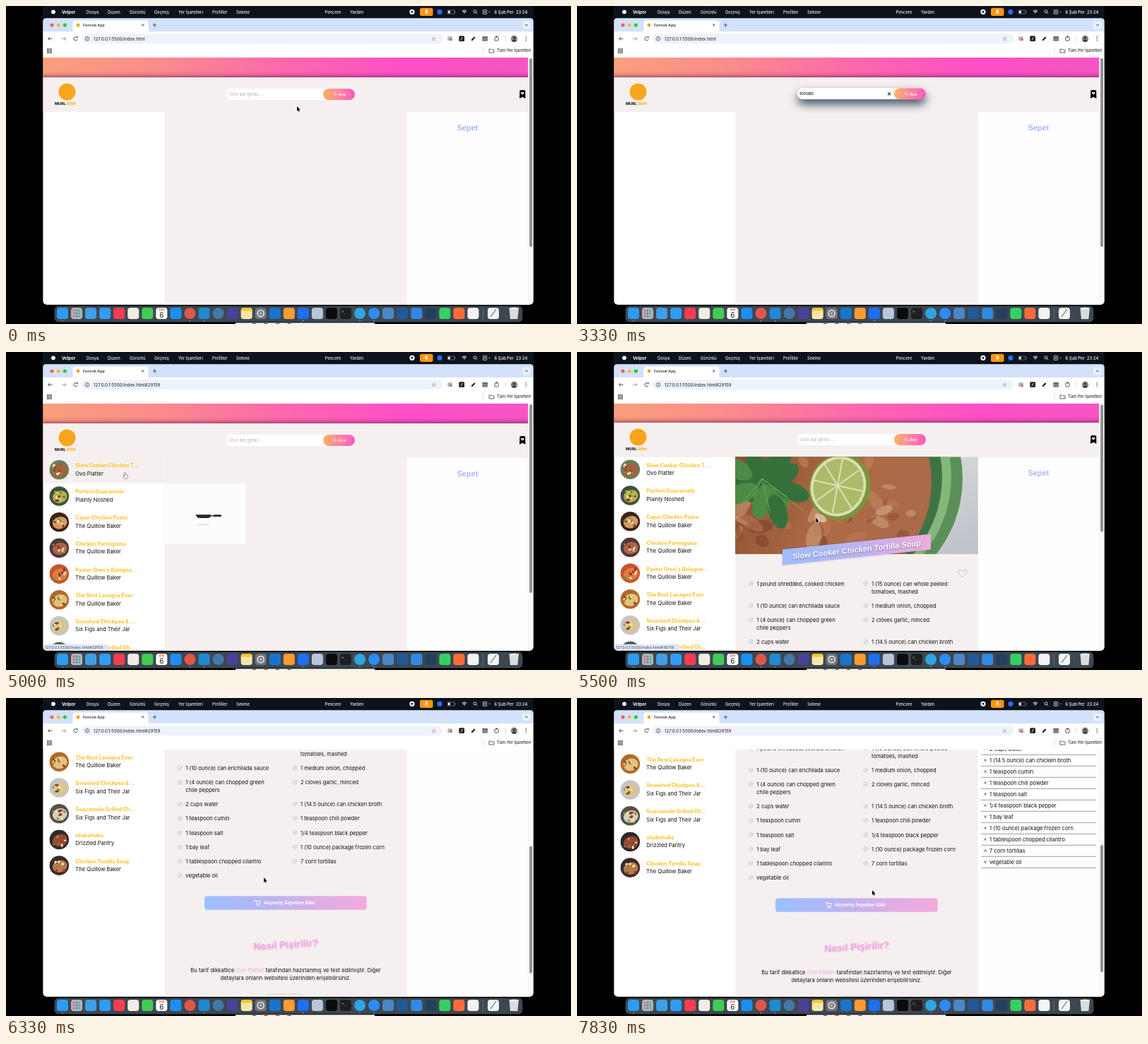
An HTML page with a canvas that plays this animation: 800 by 450 pixels, repeating every 8 s.

```html
<!DOCTYPE html>
<html lang="tr">
<head>
<meta charset="utf-8">
<title>Fennok App</title>
<style>
html, body { margin: 0; width: 100%; height: 100%; overflow: hidden; background: #000; }
canvas { display: block; width: 800px; height: 450px; }
</style>
</head>
<body>
<canvas id="stage"></canvas>
<script>
const cv = document.getElementById('stage');
const dpr = window.devicePixelRatio || 1;
cv.width = 800 * dpr;
cv.height = 450 * dpr;
const c = cv.getContext('2d');

const LOOP = 8000, STEP = 1000 / 6;
const UI = 'Inter, "Open Sans", sans-serif';
const ARIAL = '"Liberation Sans", Arial, sans-serif';

// ---------- helpers ----------
function rect(x, y, w, h, fill, r = 0) {
  c.fillStyle = fill;
  c.beginPath();
  c.roundRect(x, y, w, h, r);
  c.fill();
}
function disc(x, y, r, fill) {
  c.fillStyle = fill;
  c.beginPath();
  c.arc(x, y, r, 0, 7);
  c.fill();
}
function oval(x, y, rx, ry, rot, fill) {
  c.fillStyle = fill;
  c.beginPath();
  c.ellipse(x, y, rx, ry, rot, 0, 7);
  c.fill();
}
function ring(x, y, r, color, w = 1, from = 0, to = 7) {
  c.strokeStyle = color;
  c.lineWidth = w;
  c.beginPath();
  c.arc(x, y, r, from, to);
  c.stroke();
}
function line(color, w, ...p) {
  c.strokeStyle = color;
  c.lineWidth = w;
  c.beginPath();
  for (let i = 0; i < p.length; i += 2) c.lineTo(p[i], p[i + 1]);
  c.stroke();
}
function text(s, x, y, size, color, weight = 400, family = UI, align = 'left') {
  c.font = `${weight} ${size}px ${family}`;
  c.fillStyle = color;
  c.textAlign = align;
  c.fillText(s, x, y);
  return c.measureText(s).width;
}
function grad(x0, y0, x1, y1, ...colors) {
  const g = c.createLinearGradient(x0, y0, x1, y1);
  colors.forEach((k, i) => g.addColorStop(i / (colors.length - 1), k));
  return g;
}
function saved(draw) { c.save(); draw(); c.restore(); }
const clamp = v => Math.max(0, Math.min(1, v));
const ease = v => { v = clamp(v); return v * v * (3 - 2 * v); };
const ramp = (t, a, b) => ease((t - a) / (b - a));
function rng(seed) {
  return () => (seed = (seed * 16807) % 2147483647) / 2147483647;
}

// ---------- content ----------
const BAKER = 'The Quillow Baker', FIGS = 'Six Figs and Their Jar';
const recipes = [
  ['Slow Cooker Chicken T...', 'Ovo Platter', '#6b7a58', '#a8603c'],
  ['Perfect Guacamole', 'Plainly Noshed', '#3c5238', '#b3b54c'],
  ['Cajun Chicken Pasta', BAKER, '#3a2418', '#d69a62'],
  ['Chicken Parmigiana', BAKER, '#4a3a3c', '#b5604a'],
  ["Pastor Oren's Bologne...", BAKER, '#c8542c', '#e27a44'],
  ['The Best Lasagna Ever', BAKER, '#b06a2c', '#e8c078'],
  ['Smashed Chickpea & ...', FIGS, '#c3c6c4', '#dcc48e'],
  ['Guacamole Grilled Ch...', FIGS, '#54524a', '#d6d0b8'],
  ['shakshuka', 'Drizzled Pantry', '#2c2a2c', '#9a4a30'],
  ['Chicken Tortilla Soup', BAKER, '#3a2a26', '#bc7a4c']
];
const ingredients = [
  '1 pound shredded, cooked chicken', '1 (15 ounce) can whole peeled|tomatoes, mashed',
  '1 (10 ounce) can enchilada sauce', '1 medium onion, chopped',
  '1 (4 ounce) can chopped green|chile peppers', '2 cloves garlic, minced',
  '2 cups water', '1 (14.5 ounce) can chicken broth',
  '1 teaspoon cumin', '1 teaspoon chili powder',
  '1 teaspoon salt', '1/4 teaspoon black pepper',
  '1 bay leaf', '1 (10 ounce) package frozen corn',
  '1 tablespoon chopped cilantro', '7 corn tortillas', 'vegetable oil'
];
const keyTimes = [1833, 2000, 2167, 2333, 2667, 2833];

// time, x, y of the pointer
const path = [
  [0, 412, 142], [500, 400, 136], [1000, 372, 124], [3333, 385, 125],
  [3667, 466, 126], [3950, 470, 126], [4667, 172, 168], [5000, 168, 171],
  [5167, 190, 184], [5500, 338, 234.5], [6333, 365, 254], [6667, 402, 288],
  [7167, 408, 289], [7833, 418, 272]
];
function pointer(t) {
  let i = 0;
  while (i < path.length - 2 && t >= path[i + 1][0]) i++;
  const [a, b] = [path[i], path[i + 1]];
  const k = ramp(t, a[0], b[0]);
  return [a[1] + (b[1] - a[1]) * k, a[2] + (b[2] - a[2]) * k];
}
function scrollAt(t) {
  return ramp(t, 5445, 5500) + 259.5 * ramp(t, 5500, 6250) - 3 * ramp(t, 7000, 7700);
}

// ---------- window ----------
function menuBar() {
  rect(52, 0, 694.5, 18, '#0d131c');
  disc(67, 8.3, 2.9, '#fff');
  text('Velpor', 79, 10.5, 6, '#fff', 700);
  [['Dosya', 114], ['Düzen', 144], ['Görüntü', 175], ['Geçmiş', 210], ['Yer İşaretleri', 244],
   ['Profiller', 292], ['Sekme', 326], ['Pencere', 451.5], ['Yardım', 487]]
    .forEach(([s, x]) => text(s, x, 10.5, 5.8, '#eef0f3', 500));
  disc(575, 8.3, 3.6, '#fff');
  rect(573.7, 7, 2.6, 2.6, '#0d131c', .5);
  rect(586, 2.7, 18.5, 11.2, '#ff9410', 2.5);
  rect(594, 4.8, 2.6, 4.6, '#fff', 1.3);
  ring(595.3, 7.9, 2.4, '#fff', .7, 0, Math.PI);
  line('#fff', .7, 595.3, 10.3, 595.3, 12);
  disc(614, 8.3, 3.6, '#2d6cf0');
  c.strokeStyle = '#8e949c';
  c.lineWidth = .6;
  c.strokeRect(625.5, 6, 9.5, 5);
  rect(626.2, 6.7, 2.6, 3.6, '#fff');
  rect(635.6, 7.6, .9, 1.8, '#8e949c');
  for (const r of [1.5, 3.2, 4.9]) ring(649, 11, r, '#fff', .9, -2.3, -.85);
  ring(664, 7.8, 2, '#fff', .8);
  line('#fff', .8, 665.5, 9.3, 667.3, 11);
  c.strokeStyle = '#fff';
  c.lineWidth = .7;
  c.beginPath();
  c.roundRect(675, 5.4, 6, 2.4, 1.2);
  c.roundRect(675, 9, 6, 2.4, 1.2);
  c.stroke();
  disc(684.5, 8.3, .9, '#ff9410');
  text('6 Şub Per  23:24', 691.5, 10.5, 5.9, '#fff', 500);
}

function browser(t) {
  rect(52.5, 17.5, 694, 405, '#fff', [4, 4, 5, 5]);
  rect(52.5, 17.5, 694, 20, '#d3e2fa', [4, 4, 0, 0]);
  ['#fe5f57', '#febc2e', '#28c840'].forEach((k, i) => disc(65 + i * 9.2, 27, 2.6, k));
  rect(94.5, 20.5, 107, 18, '#fff', [4, 4, 0, 0]);
  disc(102, 27, 2.4, '#f5a01c');
  text('Fennok App', 109, 29, 5.4, '#202124', 500);
  line('#333', .8, 192, 25.2, 195.4, 28.6);
  line('#333', .8, 195.4, 25.2, 192, 28.6);
  line('#333', .8, 207.8, 27, 213, 27);
  line('#333', .8, 210.4, 24.4, 210.4, 29.6);
  rect(731, 21.5, 12, 11, '#e9f0fd', 3);
  line('#333', .9, 735, 26, 737, 28, 739, 26);

  rect(52.5, 36, 694, 37, '#fff');
  rect(107, 39.5, 511, 13.5, '#edf2fb', 6.7);
  line('#3c4043', .9, 65.5, 46.3, 59.8, 46.3);
  line('#3c4043', .9, 62.2, 43.8, 59.7, 46.3, 62.2, 48.8);
  line('#8e9296', .9, 79, 46.3, 84.8, 46.3);
  line('#8e9296', .9, 82.4, 43.8, 84.9, 46.3, 82.4, 48.8);
  ring(98.5, 46.3, 2.6, '#3c4043', .9, .3, 5.5);
  rect(100, 43.3, 1.6, 1.9, '#3c4043');
  ring(115, 46.3, 2.8, '#3c4043', .7);
  line('#3c4043', .8, 115, 45.8, 115, 48);
  disc(115, 44.7, .5, '#3c4043');
  const hash = t >= 4833 ? '#29159' : '';
  text('127.0.0.1:5500/index.html' + hash, 124, 48.5, 6.2, '#1f2023');
  text('☆', 605.7, 49, 8, '#333', 400, '"DejaVu Sans", sans-serif', 'center');
  rect(625.3, 43.3, 6.6, 5.6, '#aeb4bb', 1);
  disc(630, 47.6, 1.6, '#dd5b55');
  rect(641.3, 42.2, 7.8, 7.8, '#222', 1.6);
  line('#fff', .8, 644, 48.5, 646.4, 43.9);
  line('#222', 2.2, 659.3, 48.7, 663.8, 44);
  rect(674.3, 42.8, 7.8, 3.5, '#6b747c');
  rect(674.3, 46.3, 7.8, 3.2, '#c14e88');
  rect(676, 47, 4, 2.5, '#4aa06a');
  c.strokeStyle = '#3c4043';
  c.lineWidth = .9;
  c.beginPath();
  c.roundRect(692, 43.8, 5.2, 5.2, .8);
  c.stroke();
  disc(694.6, 43.3, 1.1, '#3c4043');
  line('#c6d4ec', .8, 707, 42, 707, 50);
  saved(() => {
    c.beginPath();
    c.arc(719.5, 46.3, 4.7, 0, 7);
    c.clip();
    rect(714, 41, 11, 11, '#8d8a80');
    disc(719.5, 45, 2, '#4a4038');
    oval(719.5, 51, 4, 3.4, 0, '#3a4540');
  });
  for (const y of [43.7, 46.3, 48.9]) disc(736.3, y, .7, '#333');

  for (const x of [58.5, 62.2]) for (const y of [60.6, 64.2]) {
    c.strokeStyle = '#3c4043';
    c.lineWidth = .8;
    c.strokeRect(x, y, 2.3, 2.3);
  }
  line('#c6d4ec', .8, 676, 59, 676, 67);
  line('#3c4043', .8, 684, 66, 684, 61, 686.5, 61, 687.4, 62, 691, 62, 691, 66, 684, 66);
  text('Tüm Yer İşaretleri', 695, 65.3, 5.8, '#333', 500);
}

// ---------- page ----------
function pageHeader(t) {
  rect(52.5, 73, 687, 28, grad(52, 66, 739, 110, '#f9a07c', '#fb8a8c', '#fc68ac', '#ff4fc8', '#f556c4'));
  rect(52.5, 92, 687, 9, grad(0, 92, 0, 101, 'rgba(110,20,80,0)', 'rgba(110,20,80,.12)', 'rgba(110,20,80,.5)'));
  rect(52.5, 101, 687, 49, '#f5f0ef');
  disc(86.5, 121.5, 12, '#f9a61c');
  const w = text('MURL ', 69, 140.2, 5.4, '#222', 800);
  text('DISH', 69 + w, 140.2, 5.4, '#f9b21c', 800);

  const hover = ramp(t, 500, 900) * (1 - ramp(t, 4050, 4400));
  saved(() => {
    c.shadowColor = `rgba(62,78,100,${hover})`;
    c.shadowBlur = 13 * dpr;
    c.shadowOffsetY = 7 * dpr;
    rect(312, 117 - hover, 182, 16, '#fff', 8);
  });
  const y = 125 - hover * .7;
  rect(449, y - 8, 45, 16, grad(449, y, 494, y + 6, '#fbb162', '#fd86a0', '#f958c2'), 8);
  ring(465.8, y - .6, 1.7, '#ffe9f0', .7);
  line('#ffe9f0', .8, 467, y + .7, 468.6, y + 2.2);
  text('Ara', 470.5, y + 2.2, 6.2, '#fff', 700, ARIAL);

  const typed = t < 4167 ? 'tomato'.slice(0, keyTimes.filter(k => t + 1 >= k).length) : '';
  if (typed) {
    const tw = text(typed, 315.3, y + 2, 6.5, '#111', 400, ARIAL);
    if (t < 3333) line('#111', .6, 315.8 + tw, y - 3, 315.8 + tw, y + 3);
    line('#344', 1.1, 440.2, y - 1.8, 444, y + 2);
    line('#344', 1.1, 444, y - 1.8, 440.2, y + 2);
  } else {
    text('Ürün adı giriniz ...', 315.3, y + 2, 6.3, '#b5b3b3', 400, ARIAL);
    if (t >= 1000 && t < 1333) line('#111', .6, 315.5, y - 3, 315.5, y + 3);
  }

  rect(727.3, 119, 8, 10, '#000', [1.5, 1.5, 0, 0]);
  c.beginPath();
  c.moveTo(727.3, 127);
  c.lineTo(727.3, 131);
  c.lineTo(731.3, 128.6);
  c.lineTo(735.3, 131);
  c.lineTo(735.3, 127);
  c.fill();
  heart(731.3, 123.6, 1.9);
  c.fillStyle = '#fff';
  c.fill();
}

function heart(x, y, s) {
  c.beginPath();
  c.moveTo(x, y + s);
  c.bezierCurveTo(x - s * 2.2, y - s * .5, x - s * .8, y - s * 1.6, x, y - s * .45);
  c.bezierCurveTo(x + s * .8, y - s * 1.6, x + s * 2.2, y - s * .5, x, y + s);
  c.closePath();
}

function loader(x, t) {
  rect(x, 186, 115, 86, '#fcfcfc');
  rect(x + 46.5, 243.4, 17, 1.9, '#dedede', 1);
  saved(() => {
    c.translate(x + 64, 232);
    c.rotate(.25 * Math.sin((t - 5000) / 110));
    c.fillStyle = '#20262a';
    c.beginPath();
    c.moveTo(-20, -2);
    c.lineTo(2, -2);
    c.lineTo(0, 2.4);
    c.quadraticCurveTo(-9, 3.6, -17.5, 2.4);
    c.fill();
    rect(-20, -1.6, 22, .9, '#47604a');
    line('#20262a', 1.4, 0, .4, 6, -.4);
    rect(5, -1.7, 11.5, 2.8, '#20262a', 1.4);
  });
}

function thumb(x, y, base, food, seed) {
  saved(() => {
    c.beginPath();
    c.arc(x, y, 13.8, 0, 7);
    c.clip();
    rect(x - 14, y - 14, 28, 28, base);
    oval(x + 1, y + 1, 10.5, 8.5, -.3, food);
    const rnd = rng(seed * 97 + 31);
    const tones = ['#7c8c44', '#f0dcb0', '#8c3c24', food];
    for (let i = 0; i < 11; i++)
      oval(x - 8 + rnd() * 17, y - 6 + rnd() * 14, 1 + rnd() * 2, 1 + rnd(), rnd() * 3, tones[i % 4]);
  });
}

function recipeList(t) {
  recipes.forEach(([title, by, base, food], i) => {
    const hot = i === 0 && t >= 4583 && t < 5250;
    const y = 167.3 + i * 36.7 - (hot ? .5 : 0);
    if (hot) rect(52.5, 149.5, 171.5, 36, '#f5f0ef');
    thumb(75.3, y, base, food, i + 1);
    text(title, 98.3, y - 3.6, 7.25, '#fbc83c', 800);
    text(by, 98.3, y + 7.8, 7.55, '#111');
  });
}

function soupPhoto() {
  saved(() => {
    c.beginPath();
    c.rect(224.3, 149.5, 343.5, 137.5);
    c.clip();
    rect(224, 149, 344, 138, grad(500, 149, 568, 287, '#d4dad8', '#bfc0cb'));
    oval(365, 180, 181, 176, 0, '#5a9057');
    oval(356, 178, 174, 172, 0, '#84b878');
    oval(346, 178, 171, 168, 0, '#3f7345');
    oval(330, 185, 172, 164, 0, grad(224, 150, 500, 287, '#8c4f30', '#ad6a45', '#a96a4c'));
    const rnd = rng(77);
    const tones = ['#c48a62', '#8f4c31', '#bd7a54', '#d3a380', '#74402c'];
    for (let i = 0; i < 38; i++)
      oval(224 + rnd() * 260, 152 + rnd() * 132, 4 + rnd() * 17, 3 + rnd() * 8, rnd() * 3, tones[i % 5] + '88');
    // lime slice
    oval(372, 192, 43, 47, .35, '#77963f');
    oval(370, 191, 39, 43, .35, '#dbe0ae');
    oval(370, 191, 35, 39, .35, '#adba6b');
    for (let i = 0; i < 8; i++) {
      const a = i * Math.PI / 4 + .2;
      line('#dde2b4', 2, 369, 190, 369 + 36 * Math.cos(a), 190 + 39 * Math.sin(a));
    }
    // herb leaves
    for (let i = 0; i < 13; i++) {
      const a = i * 2.4, r = 8 + i * 3.4;
      oval(270 + r * 1.05 * Math.cos(a), 188 + r * .9 * Math.sin(a), 25, 13, a, i % 3 ? '#35703a' : '#4d8a45');
    }
    for (let i = 0; i < 5; i++) line('#79a763', 1, 262, 180, 225 + i * 24, 226 - i % 2 * 20);
    oval(345, 236, 9, 5, .5, '#dfb294');
    oval(435, 225, 13, 6, -.4, '#c98f6e');
  });
}

function banner() {
  saved(() => {
    c.transform(1, -.105, 0, 1, 396, 280.5);
    c.shadowColor = 'rgba(70,50,90,.3)';
    c.shadowBlur = 3 * dpr;
    rect(-105, -11, 210, 22, grad(-105, 0, 105, 0, '#9abfff', '#bcb3f0', '#f0abdc'));
    c.shadowColor = 'rgba(40,40,80,.5)';
    c.shadowOffsetY = dpr;
    text('Slow Cooker Chicken Tortilla Soup', 0, 4, 11, '#fff', 700, ARIAL, 'center');
  });
}

function recipe(t) {
  soupPhoto();
  banner();
  heart(545.7, 314, 5.3);
  c.strokeStyle = '#b9b6b8';
  c.lineWidth = .8;
  c.stroke();

  const rows = [329, 360, 380, 411];
  ingredients.forEach((s, i) => {
    const r = i >> 1, x = i % 2 ? 417 : 254.3;
    const y = r < 4 ? rows[r] : 411 + (r - 3) * 20.2;
    ring(x - 8.2, y - .3, 3, '#a9c8ea', .7);
    line('#8fb4de', .8, x - 9.8, y - .5, x - 8.5, y + .8, x - 5.8, y - 2.2);
    s.split('|').forEach((part, k) => text(part, x, y + 2.6 + k * 11, 7.55, '#111'));
  });

  rect(281, 540.7, 229.7, 19.5, grad(281, 0, 511, 0, '#9bc0ff', '#b4b5f4', '#d9aee6', '#f3abdb'), 4);
  line('#fff', .9, 351.5, 546.8, 353.3, 546.8, 355, 552, 359, 552, 360.2, 548, 354, 548);
  disc(355.4, 554, .9, '#fff');
  disc(358.8, 554, .9, '#fff');
  text('Alışveriş Sepetine Ekle', 365, 552.7, 6.6, '#fff', 700, ARIAL);

  saved(() => {
    c.transform(1, -.06, 0, 1, 396, 609);
    c.shadowColor = 'rgba(190,120,190,.45)';
    c.shadowBlur = 2 * dpr;
    c.shadowOffsetX = c.shadowOffsetY = dpr;
    text('Nasıl Pişirilir?', 0, 5, 13.8, '#f5a9e4', 700, ARIAL, 'center');
  });

  const parts = [['Bu tarif dikkatlice ', '#111'], ['Ovo Platter', '#f0a8e0'],
    [' tarafından hazırlanmış ve test edilmiştir. Diğer', '#111']];
  c.font = `400 7.6px ${UI}`;
  let x = 396 - c.measureText(parts.map(p => p[0]).join('')).width / 2;
  for (const [s, k] of parts) x += text(s, x, 648, 7.6, k);
  text('detaylara onların websitesi üzerinden erişebilirsiniz.', 396, 659, 7.6, '#111', 400, UI, 'center');
  c.strokeStyle = '#c9c5c8';
  c.lineWidth = .8;
  c.beginPath();
  c.roundRect(370, 679.5, 50, 18, 4);
  c.stroke();
}

function basket() {
  let y = 211.5;
  for (const s of ingredients) {
    const lines = s.split('|');
    const h = 16 + (lines.length - 1) * 11;
    const mid = y + (lines.length - 1) * 5.5;
    line('#333', .7, 576.4, mid - 1.7, 579.8, mid + 1.7);
    line('#333', .7, 579.8, mid - 1.7, 576.4, mid + 1.7);
    lines.forEach((p, k) => text(p, 584, y + 2.6 + k * 11, 7.55, '#111'));
    line('#858585', .8, 572, y + h - 7.7, 735, y + h - 7.7);
    y += h;
  }
}

function page(t) {
  const s = scrollAt(t), open = t >= 5330;
  saved(() => {
    c.beginPath();
    c.roundRect(52.5, 73, 694, 349.5, [0, 0, 5, 5]);
    c.clip();
    c.translate(0, -s);
    rect(52.5, 100, 694, 700, '#fff');
    rect(224.3, 149.5, 343.5, 650, '#f5f0ef');
    rect(567.8, 149.5, 171.7, 650, '#fefefe');
    pageHeader(t);
    text('Sepet', 653.5, 175.5, 10.9, '#a3b8fa', 700, ARIAL, 'center');
    if (t >= 3830 && t < 4165) loader(52.5, t);
    if (t >= 4165) recipeList(t);
    if (t >= 4830 && !open) loader(224.5, t);
    if (open) recipe(t);
    if (t >= 6830) basket();
    c.translate(0, s);

    rect(739.5, 73, 7.5, 350, '#fafafa');
    line('#e6e6e6', .5, 739.7, 73, 739.7, 423);
    rect(741.2, 74 + s * .52, 3.9, open ? 180 : 267, '#8e8e8e', 2);

    if (t >= 4580 && t < 5800) {
      rect(52.5, 413.6, 93, 9, '#dde6f6', [0, 3, 0, 0]);
      text('127.0.0.1:5500/index.html#' + (t < 5330 ? '29159' : '36718'), 55, 420.2, 5.4, '#4a4f57');
    }
  });
}

// ---------- dock ----------
const dock = ('#2b9cf2 #b4b7c0 #3f9fe8 #2f9df6 #fa3c52 #f1ece4 #3fce52 #ffffff #1c8ff4 #e2564a ' +
  '#2089d0 #4478a8 #4a4298 #f8eaa8 #70747a #1b74cc #ff9b30 #1f6ff0 #b9c6da #0b0b0b ' +
  '#1e1e20 #2ea5e0 #2d8cff #4b87c4 #215a98 #2e8ae4 #24405e #36d062 #ff6c38 #f3f3f3').split(' ');
const round = [9, 11, 21, 22];

function dockBar() {
  rect(68.5, 424.5, 663, 22.7, '#3d4751', 6);
  dock.forEach((k, i) => {
    const x = 80 + i * 20.05;
    if (round.includes(i)) disc(x, 435, 8, k);
    else rect(x - 8, 427, 16, 16, k, 3.8);
  });
  for (let i = 0; i < 9; i++)
    rect(94.6 + i % 3 * 4, 429.6 + (i / 3 | 0) * 4, 2.8, 2.8, ['#f06a5a', '#58b86a', '#4a8ae8'][i * 2 % 3], .8);
  text('ŞUB', 220.3, 431.2, 3.6, '#f0433c', 700, UI, 'center');
  text('6', 220.3, 441, 10, '#222', 400, UI, 'center');
  rect(332.7, 427, 16, 4.5, '#f8c62f', [3.8, 3.8, 0, 0]);
  line('#d6cfa8', .6, 335, 435, 346, 435);
  line('#d6cfa8', .6, 335, 438.5, 346, 438.5);
  ring(360.7, 435, 4.5, '#d4d6d9', 2);
  disc(360.7, 435, 1.5, '#d4d6d9');
  text('>_', 475.3, 433.8, 5, '#eee', 400, '"DejaVu Sans Mono", monospace');
  line('#77818b', .6, 675.5, 428, 675.5, 444);
  rect(682, 427, 16, 16, '#f3f4f2', 3.8);
  line('#66727a', 1.2, 686, 440, 694, 429);
  c.fillStyle = '#d9dde0';
  c.beginPath();
  c.moveTo(712.5, 427.5);
  c.lineTo(726, 427.5);
  c.lineTo(724.4, 443);
  c.lineTo(714, 443);
  c.fill();
  oval(719.2, 427.8, 6.8, 1.3, 0, '#f5f6f7');
  for (const i of [0, 9, 10, 17, 21, 22]) disc(80 + i * 20.05, 445.6, .7, '#d5d8db');
  rect(325, 448.2, 197, 2, '#eef0f1');
  for (let i = 0; i < 4; i++) rect(349 + i * 16.5, 448.8, 5, 1.2, '#555');
}

// ---------- pointer ----------
function drawPointer(t) {
  if (t >= 1830 && t < 3400) return;
  const [x, y] = pointer(t);
  saved(() => {
    c.translate(x, y);
    c.lineJoin = 'round';
    const form = t < 4100 && y > 117 && y < 133;
    if (form && x < 440) {
      line('#222', .8, -1.4, -4, 0, -3.4, 0, 3.4, -1.4, 4);
      line('#222', .8, 1.4, -4, 0, -3.4, 0, 3.4, 1.4, 4);
      return;
    }
    const hand = form || (t > 4580 && t < 5160) || (t > 6600 && t < 7250);
    c.beginPath();
    const p = hand
      ? [0, 0, 1.1, 0, 1.4, 2.7, 4.4, 3.6, 4.4, 5.8, 3.4, 8, .4, 8, -1.6, 5, -1.4, 4.2, 0, 5]
      : [0, 0, 0, 6.9, 1.6, 5.5, 2.7, 7.8, 3.8, 7.3, 2.7, 5, 4.8, 5];
    for (let i = 0; i < p.length; i += 2) c.lineTo(p[i], p[i + 1]);
    c.closePath();
    c.strokeStyle = hand ? '#111' : '#fff';
    c.lineWidth = hand ? .9 : 1.1;
    c.stroke();
    c.fillStyle = hand ? '#fff' : '#000';
    c.fill();
  });
}

function frame(now) {
  const t = Math.floor(((now % LOOP) + 4) / STEP) * STEP;
  c.setTransform(dpr, 0, 0, dpr, 0, 0);
  rect(0, 0, 800, 450, '#000');
  menuBar();
  browser(t);
  page(t);
  dockBar();
  drawPointer(t);
}

const start = performance.now();
function tick() {
  frame(performance.now() - start);
  requestAnimationFrame(tick);
}
tick();
</script>
</body>
</html>
```
